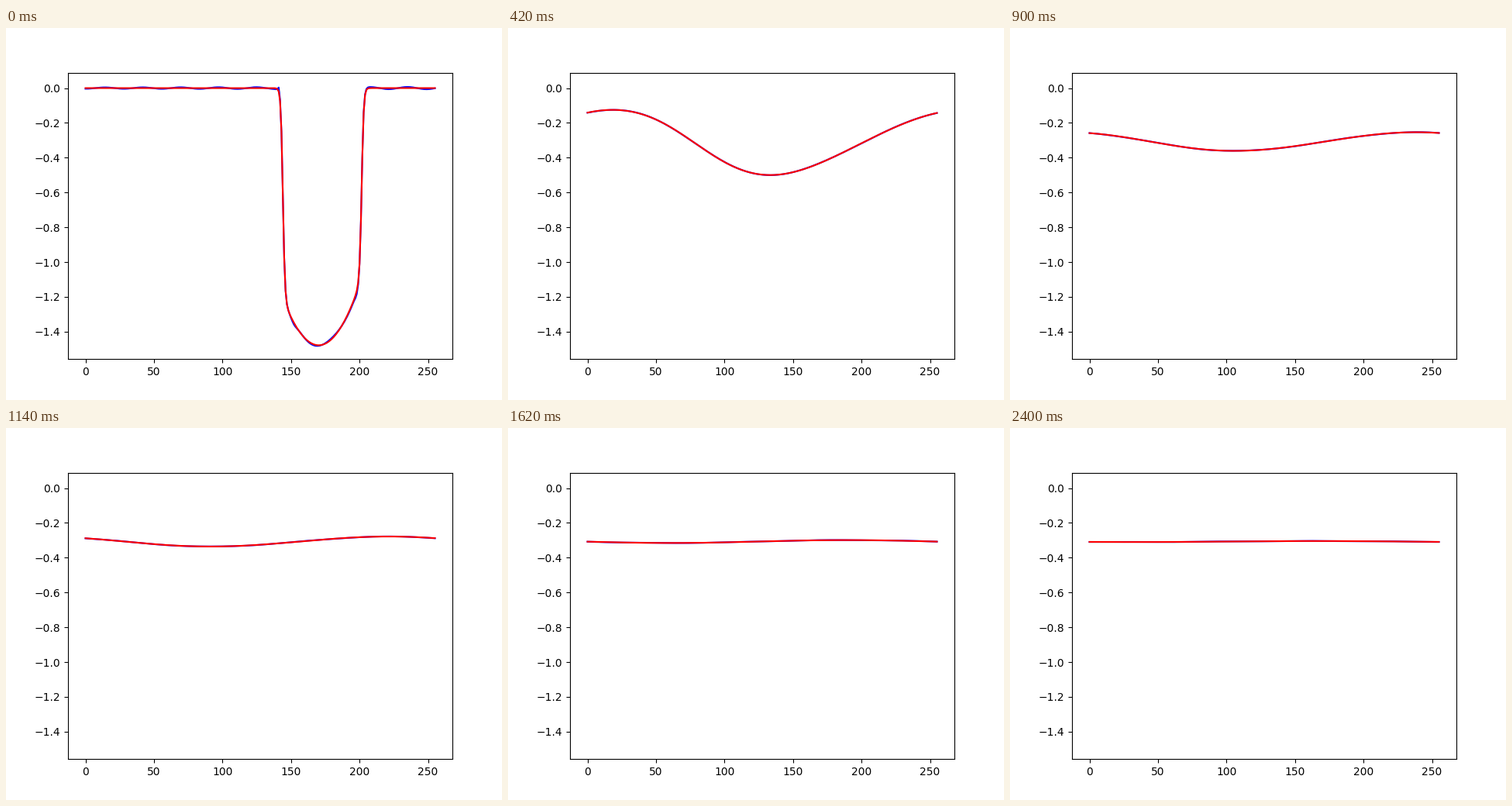
Animation of 640 by 480 pixels, one loop 2460 ms. Source, as a matplotlib script:

```python
import numpy as np
import matplotlib.pyplot as plt
from matplotlib.animation import FuncAnimation

N, FRAMES, INTERVAL = 256, 41, 60
DT, NU = 0.05, 0.0785
x = np.arange(N)
k = 2 * np.pi * np.fft.fftfreq(N, 1 / N)


def bump(centre, width):
    return np.exp(-((x - centre) / width) ** 2)


# Parabolic dip between two smooth steps
window = 0.5 * (np.tanh((x - 144) / 1.5) - np.tanh((x - 201.6) / 1.5))
start = window * (-1.478 + 3.95e-4 * (x - 170.2) ** 2)
mean = start.mean()

# Cole-Hopf transform of the initial state, in the moving frame
spectrum = np.fft.fft(start - mean)
potential = np.zeros(N, complex)
potential[1:] = -spectrum[1:] / (2j * NU * k[1:])
heat0 = np.fft.fft(np.exp(np.fft.ifft(potential).real))

# Ripple of the approximate curve, with an overshoot at the left step
# and a dent at the inner corner of each step
swell = 0.004 + 0.003 * x / N
ripple = swell * np.cos(2 * np.pi * (x - 235) / 27.6)
ripple += 0.03 * bump(141.2, 0.9) - 0.016 * (bump(152, 3) + bump(198, 1.6))


def burgers(n):
    if n == 0:
        return start
    # The wave settles towards a standing state late in the run
    step = n if n <= 30 else 30 + 4 * (1 - np.exp(-(n - 30) / 4))
    t = step * DT
    heat = heat0 * np.exp(-NU * k ** 2 * t - 1j * k * mean * t)
    phi = np.fft.ifft(heat).real
    slope = np.fft.ifft(1j * k * heat).real
    return mean - 2 * NU * slope / phi


def approximate(n, exact):
    wobble = 0.0007 * np.sin(2 * np.pi * 4 * x / N + 0.6 * n) if n else 0
    return exact + ripple * 0.15 ** n + wobble


fig, ax = plt.subplots(figsize=(6.4, 4.8), dpi=100)
approx_line, = ax.plot(x, start, color="blue")
exact_line, = ax.plot(x, start, color="red")
ax.set_xlim(-12.75, 267.75)
ax.set_ylim(-1.5576, 0.0887)


def draw(n):
    exact = burgers(n)
    approx_line.set_ydata(approximate(n, exact))
    exact_line.set_ydata(exact)
    return approx_line, exact_line


anim = FuncAnimation(fig, draw, frames=FRAMES, interval=INTERVAL, repeat=True)
plt.show()
```
